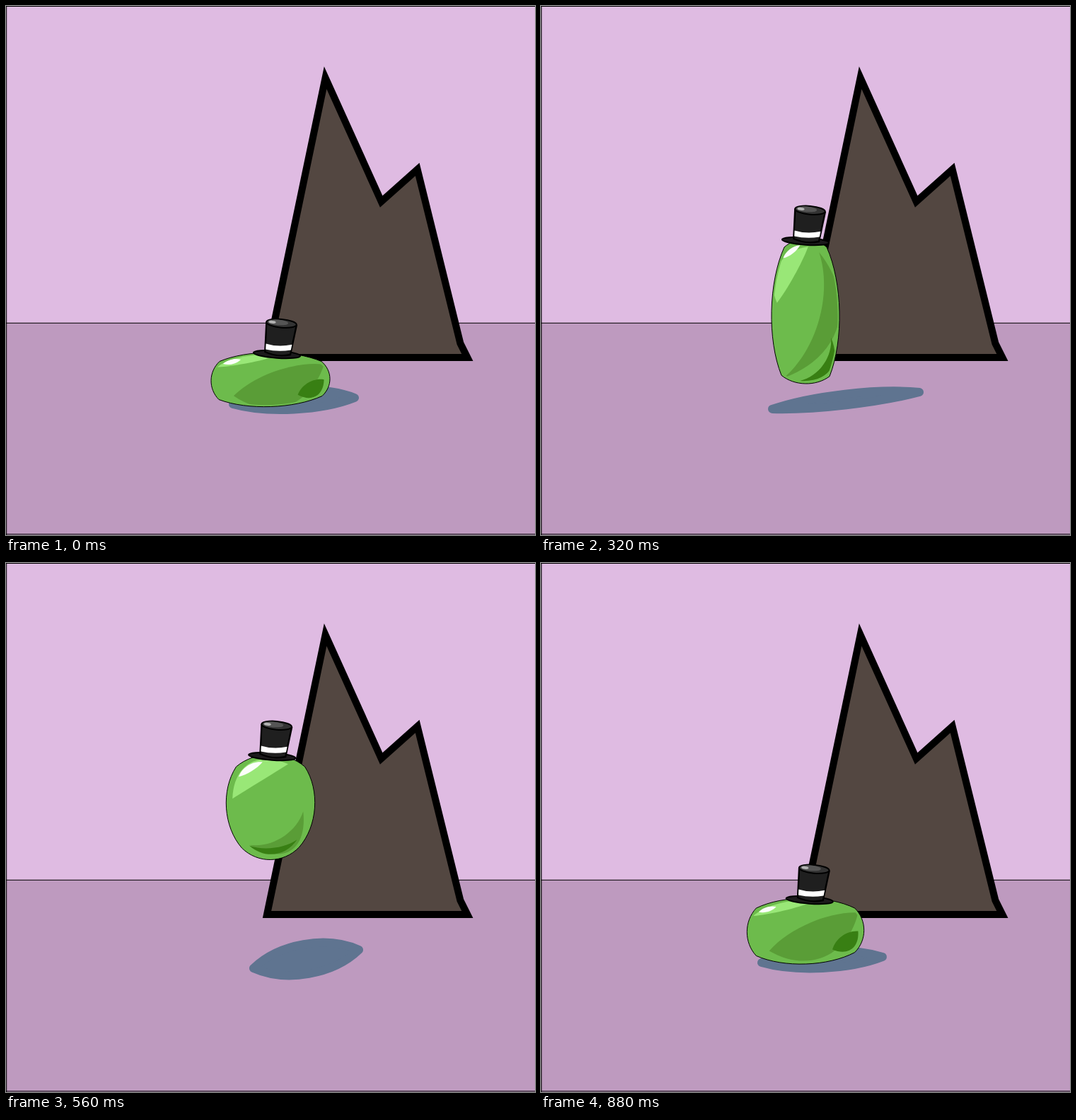
Recreate the animation shown at these times as an HTML page. Size 748 by 748 pixels, loop 960 ms.

```html
<!DOCTYPE html>
<html lang="en">
<head>
<meta charset="utf-8">
<title>Bouncing slime</title>
<style>
html, body { margin: 0; width: 100%; height: 100%; overflow: hidden; background: #be9abf; }
svg { display: block; width: 100%; height: 100%; }
</style>
</head>
<body>
<svg viewBox="0 0 748 748">
  <clipPath id="clip"><path id="inner"/></clipPath>
  <rect width="748" height="448" fill="#dfbbe2"/>
  <rect y="448" width="748" height="300" fill="#be9abf"/>
  <path d="M0 448.3H748M0 .5H748M.7 0V748M0 746.9H748" stroke="#000"/>
  <path d="M369 497L451.6 101.5L530.7 276.5L581.7 231L642.4 477L652.4 497Z"
    fill="#534741" stroke="#000" stroke-width="10" stroke-miterlimit="10"/>
  <path id="shadow" fill="#5f7490" stroke="#5f7490" stroke-width="12" stroke-linejoin="round"/>
  <path id="body" fill="#6dbb4c" stroke="#000"/>
  <g clip-path="url(#clip)">
    <path id="light" fill="#99e777"/>
    <path id="shine" fill="#fbfffa"/>
    <path id="mid" fill="#5a9d37"/>
    <path id="dark" fill="#387f13"/>
  </g>
  <g id="hat" stroke="#000" stroke-width="2">
    <ellipse cx="383" cy="492.5" rx="33.2" ry="5.2" transform="rotate(4 383 492.5)" fill="#1c1a1c"/>
    <path d="M368.3 448L366.3 489Q383 497 402 493L410.7 452Z" fill="#1f1f1f" stroke-width="2.4"/>
    <path d="M367.6 477.5Q385 483 404.4 478.8L402.8 486.6Q384 489.5 367.2 485.4Z" fill="#fff" stroke="none"/>
    <g transform="rotate(5 389.5 448.8)">
      <ellipse cx="389.5" cy="448.8" rx="21.4" ry="5.9" fill="#333"/>
      <ellipse cx="384.5" cy="447.8" rx="14.5" ry="3.8" fill="#555" stroke="none"/>
      <ellipse cx="376.5" cy="448" rx="5" ry="2" fill="#b4b4b4" stroke="none"/>
    </g>
  </g>
</svg>
<script>
const STEP = 80, STEPS = 12, CENTER = 374;
const el = id => document.getElementById(id);
const mix = (a, b, k) => a.map((v, i) => v + (b[i] - v) * k);

// Shading inside the body box (0 to 1): two tips, then the bulge of each edge
const looks = {
  flat: {
    light: [.05, .27, .57, .05, .1, .03],
    shine: [.1, .21, .25, .13, .13, .13],
    mid: [.19, .8, .95, .22, .1, .28],
    dark: [.73, .78, .95, .5, .17, .34]
  },
  round: {
    light: [.07, .44, .53, .08, .27, .18],
    shine: [.11, .33, .22, .17, .24, .22],
    mid: [.29, .96, .81, .19, -.23, .53],
    dark: [.74, .85, .94, .51, -.08, .35]
  },
  hang: {
    light: [.07, .42, .7, .09, .32, 0],
    shine: [.14, .21, .41, .07, .17, .07],
    mid: [.27, .86, .87, .54, -.17, .42],
    dark: [.26, .865, .8, .81, -.11, .24]
  },
  tall: {
    light: [.08, .44, .54, .05, .27, .03],
    shine: [.17, .13, .42, .04, .14, .1],
    mid: [.18, .96, .7, .09, -.14, .29],
    dark: [.42, .98, .875, .68, -.18, .34]
  }
};
const { flat, round, hang, tall } = looks;
const parts = Object.keys(flat);
const blend = (a, b, k) =>
  Object.fromEntries(parts.map(p => [p, mix(a[p], b[p], k)]));

// body: half width, top, bottom, corner insets (upper x, lower x, y)
// shadow: two tips and the bulge of each edge
const poses = [
  { at: 0, look: flat, body: [84, 490, 566.5, 12, 11, 12.5], shadow: [321, 563, 493, 554, .09, .07] },
  { at: 2, look: round, body: [64.5, 447, 567, 18.5, 12, 18], shadow: [329, 569, 490, 560, .1, .1] },
  { at: 4, look: tall, body: [48, 330, 534, 18, 14, 11], shadow: [327, 570, 535, 546, .045, .03] },
  { at: 5, look: hang, body: [59.5, 271, 418.5, 14, 21, 17], shadow: [349, 566, 499, 540, .1, .11] },
  { at: 7, look: hang, body: [62.5, 271, 419.5, 14, 22, 17], shadow: [350, 573, 499, 547, .14, .14] },
  { at: 9, look: blend(round, hang, .5), body: [51.5, 398, 566.5, 16, 16.5, 18], shadow: [384, 580, 559, 569, .05, .05] },
  { at: 11, look: flat, body: [82.7, 474, 567, 13, 13, 14], shadow: [312, 565, 483, 557, .075, .07] }
];

// Arc from a to b that swells to the left of its direction by depth
function arc([ax, ay], [bx, by], depth) {
  const dx = bx - ax, dy = by - ay, h = depth * 4 / 3 / Math.hypot(dx, dy);
  const handle = t => [ax + dx * t + dy * h, ay + dy * t - dx * h];
  return "C" + [handle(.276), handle(.724), [bx, by]].join(" ");
}

// Closed shape of two arcs between its tips
function lens([ax, ay, bx, by, out, back]) {
  const a = [ax, ay], b = [bx, by], len = Math.hypot(bx - ax, by - ay);
  return "M" + a + arc(a, b, out * len) + arc(b, a, back * len) + "Z";
}

// Four corners joined by arcs that reach the edges of the box
function blob([half, top, bottom, upper, lower, inset], rim = 0) {
  const l = CENTER - half + rim, r = CENTER + half - rim;
  const t = top + rim, b = bottom - rim, side = (upper + lower) / 2;
  const tilt = (half - 56) * .09;
  const tl = [l + upper, t + inset], tr = [r - upper, t + inset];
  const br = [r - lower, b - inset - tilt], bl = [l + lower, b - inset + tilt];
  return "M" + tl + arc(tl, tr, inset) + arc(tr, br, side) +
    arc(br, bl, inset) + arc(bl, tl, side) + "Z";
}

let shown = -1;
function draw(ms) {
  const step = Math.floor(ms / STEP) % STEPS;
  if (step === shown) return;
  shown = step;
  const i = Math.max(0, poses.findIndex(p => p.at >= step) - 1);
  const a = poses[i], b = poses[i + 1];
  const k = (step - a.at) / (b.at - a.at);
  const set = (id, d) => el(id).setAttribute("d", d);

  const body = mix(a.body, b.body, k);
  const [half, top, bottom] = body, height = bottom - top;
  set("shadow", lens(mix(a.shadow, b.shadow, k)));
  set("body", blob(body));
  set("inner", blob(body, 2.5));

  const look = blend(a.look, b.look, k);
  for (const name of parts) {
    const [u1, v1, u2, v2, ...bulge] = look[name];
    const place = (u, v) => [CENTER + (2 * u - 1) * half, top + v * height];
    set(name, lens([...place(u1, v1), ...place(u2, v2), ...bulge]));
  }

  // The hat rides on top and slips left as the body stretches
  const slip = -.8 * Math.sqrt(Math.max(0, height - 76.5));
  el("hat").setAttribute("transform", `translate(${slip} ${top - 490})`);
}

const start = performance.now();
function tick() {
  draw(performance.now() - start);
  requestAnimationFrame(tick);
}
tick();
</script>
</body>
</html>
```
